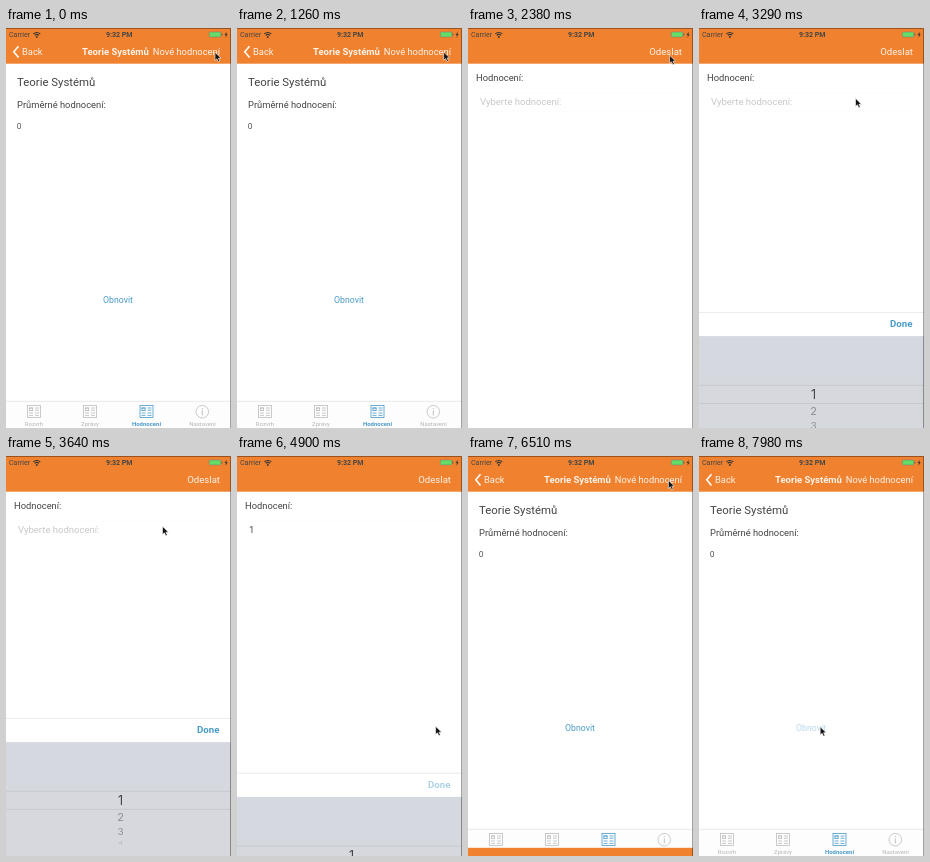
An HTML page for the animation above (8000 ms loop, 225 by 400 pixels).

```html
<!DOCTYPE html>
<html lang="cs">
<head>
<meta charset="utf-8">
<title>Hodnocení</title>
<style>
  html, body { margin: 0; width: 100%; height: 100%; overflow: hidden; background: #fff; }
  svg { display: block; width: 100vw; height: 100vh; }
  text { font: 9.35px Roboto, "Open Sans", sans-serif; fill: #444; }
  .nav { fill: #f0822f; }
  .nav-text { fill: #fff; fill-opacity: .9; }
  .end { text-anchor: end; }
  .mid { text-anchor: middle; }
  .blue { fill: #4a9bc8; }
  .digit { font-family: Inter, sans-serif; }
  .tab { font-size: 6px; text-anchor: middle; fill: #b4b4b4; }
  .tab.blue { fill: #4a9bc8; font-weight: 700; }
  .hair { stroke: #dcdcdc; stroke-width: .6; }
</style>
</head>
<body>
<svg viewBox="0 0 225 400">
  <defs>
    <g id="news" fill="none" stroke="currentColor" stroke-width=".8">
      <rect x=".5" y=".5" width="13" height="12"/>
      <path d="M2 3h4M8 3h4M8 5.2h4M2 8h4M8 8h4M2 10.4h4M8 10.4h4"/>
      <rect x="2.4" y="3" width="3.2" height="2.6"/>
    </g>
    <linearGradient id="wheel" x2="0" y2="1">
      <stop stop-color="#d5d8df"/>
      <stop offset="1" stop-color="#d6d8dd"/>
    </linearGradient>
  </defs>

  <g id="detail">
    <rect width="225" height="400" fill="#fff"/>
    <rect class="nav" width="225" height="35.7"/>
    <path d="M12.5 18.2 7.8 23.8l4.7 5.6" fill="none" stroke="#fff" stroke-width="1.6"/>
    <text class="nav-text" x="16" y="27">Back</text>
    <text class="nav-text" x="76" y="27" style="font-size:9.5px;font-weight:700">Teorie Systémů</text>
    <text class="nav-text end" id="add" x="214" y="27">Nové hodnocení</text>
    <text x="11" y="58" style="font-size:11.4px">Teorie Systémů</text>
    <text x="11" y="80.3">Průměrné hodnocení:</text>
    <text class="digit" x="10.8" y="101" style="font-size:7.6px">0</text>
    <text class="blue mid" id="refresh" x="112" y="275" style="font-size:8.75px">Obnovit</text>

    <rect y="373" width="225" height="27" fill="#fdfdfd"/>
    <path class="hair" d="M0 373.3h225"/>
    <g color="#bdbdbd">
      <use href="#news" x="21" y="377"/>
      <use href="#news" x="77" y="377"/>
      <use href="#news" x="133.5" y="377" color="#4a9bc8"/>
      <circle cx="196.3" cy="383.7" r="6.3" fill="none" stroke="currentColor" stroke-width=".8"/>
      <path d="M196.3 380v1.2M196.3 382.4v5" stroke="currentColor"/>
    </g>
    <text class="tab" x="28" y="398">Rozvrh</text>
    <text class="tab" x="84" y="398">Zprávy</text>
    <text class="tab blue" x="140.5" y="398">Hodnocení</text>
    <text class="tab" x="196.5" y="398">Nastavení</text>
  </g>

  <g id="form">
    <rect width="225" height="400" fill="#fff"/>
    <rect class="nav" width="225" height="35.7"/>
    <text class="nav-text end" id="send" x="214" y="27" style="font-size:9.6px">Odeslat</text>
    <text x="8" y="53">Hodnocení:</text>
    <path d="M8 65h209M8 83h209" stroke="#fcfcfc"/>
    <text id="field" x="12" y="77" style="font-size:9.5px"></text>
  </g>

  <g id="picker">
    <rect y="262" width="225" height="24" fill="#fff"/>
    <path class="hair" d="M0 262.3h225"/>
    <text class="blue end" id="done" x="213.5" y="277.3" style="font-size:9.7px;font-weight:700">Done</text>
    <rect y="286" width="225" height="114" fill="url(#wheel)"/>
    <path d="M0 335.2h225M0 353.3h225" stroke="#c1c3c9" stroke-width=".7"/>
    <g id="digits"></g>
  </g>

  <g id="status">
    <text x="3" y="9.3" style="font-size:7.1px">Carrier</text>
    <g fill="none" stroke="#333" stroke-width="1.1">
      <path d="M27.3 5.9a5 5 0 0 1 7 0M28.7 7.4a3 3 0 0 1 4.2 0"/>
      <circle cx="30.8" cy="9" r=".4"/>
    </g>
    <text class="mid" x="113.2" y="9.3" style="font-size:7.05px;font-weight:700">9:32 PM</text>
    <rect x="203.3" y="4" width="11.6" height="5" rx="1" fill="#65db68" stroke="#777" stroke-width=".5"/>
    <path d="M215.8 5.5v2" stroke="#555" stroke-width=".8"/>
    <path d="M220.8 3.7 218.5 7h1.4l-.5 2.8L221.7 6.3h-1.4z" fill="#333"/>
  </g>
  <path d="M0 .5h224.5V400" fill="none" stroke="#000" stroke-opacity=".36"/>
  <path id="cursor" d="M0 0v8.2l1.9-1.7 1.4 3 1.5-.7-1.4-2.9h2.6z" fill="#111" stroke="#fff" stroke-width=".6"/>
</svg>
<script>
const LOOP = 8000, STEP = 70;
const $ = id => document.getElementById(id);
const clamp = v => Math.max(0, Math.min(1, v));

// Critically damped spring: 0 before start, then settling at 1.
const spring = (t, start) => {
  const x = Math.max(0, t - start) * 0.01826;
  return 1 - (1 + x) * Math.exp(-x);
};
// Button opacity: dims while held, fades back after release.
const press = (t, down, up) =>
  t < down ? 1 : t < up ? 0.4 : 0.4 + 0.6 * clamp((t - up) / 250);

// Pointer stops: time, x, y
const path = [
  [0, 209, 24.3], [1000, 209, 24.3], [1500, 204.6, 23.8], [1960, 204.6, 23.8],
  [2310, 201.6, 27.3], [2590, 201.6, 27.3], [3010, 156.5, 70.3], [3780, 156.5, 70.3],
  [4480, 198.6, 270.3], [5110, 198.6, 270.3], [5810, 200.4, 24.3], [6650, 200.4, 24.3],
  [7490, 121.2, 270.8], [LOOP, 121.2, 270.8]
];
function pointerAt(t) {
  const i = path.findIndex(p => p[0] > t);
  const [t0, x0, y0] = path[i - 1], [t1, x1, y1] = path[i];
  const u = (t - t0) / (t1 - t0), k = u * u * (3 - 2 * u);
  return [x0 + (x1 - x0) * k, y0 + (y1 - y0) * k];
}

// Wheel rows: baseline, font size, vertical squash, colour
$('digits').innerHTML = [
  [348.7, 12.5, 1, '#444'], [365, 11, .92, '#8b8d92'],
  [379.3, 10, .85, '#8f9196'], [388.8, 8.5, .55, '#b9bbc0']
].map(([y, size, squash, fill], i) =>
  `<text class="mid digit" transform="translate(114.5 ${y}) scale(1 ${squash})" style="font-size:${size}px;fill:${fill}">${i + 1}</text>`
).join('');

const move = (id, x, y) => $(id).setAttribute('transform', `translate(${x} ${y})`);

function draw(t) {
  move('form', 0, 400 * (1 - spring(t, 1635) + spring(t, 6192)));
  move('picker', 0, 138 * (1 - spring(t, 3110) + spring(t, 4825)));
  move('cursor', ...pointerAt(t));

  const chosen = t >= 4760;
  $('field').textContent = chosen ? '1' : 'Vyberte hodnocení:';
  $('field').style.fill = chosen ? '#444' : '#c8c8c8';

  $('add').style.opacity = press(t, 1540, 1650);
  $('send').style.opacity = press(t, 6090, 6180);
  $('done').style.opacity = press(t, 4720, 4880);
  $('refresh').style.opacity = press(t, 7900, LOOP);
}

function tick() {
  const t = performance.now() % LOOP;
  draw(Math.floor(t / STEP) * STEP);
  requestAnimationFrame(tick);
}
tick();
</script>
</body>
</html>
```
